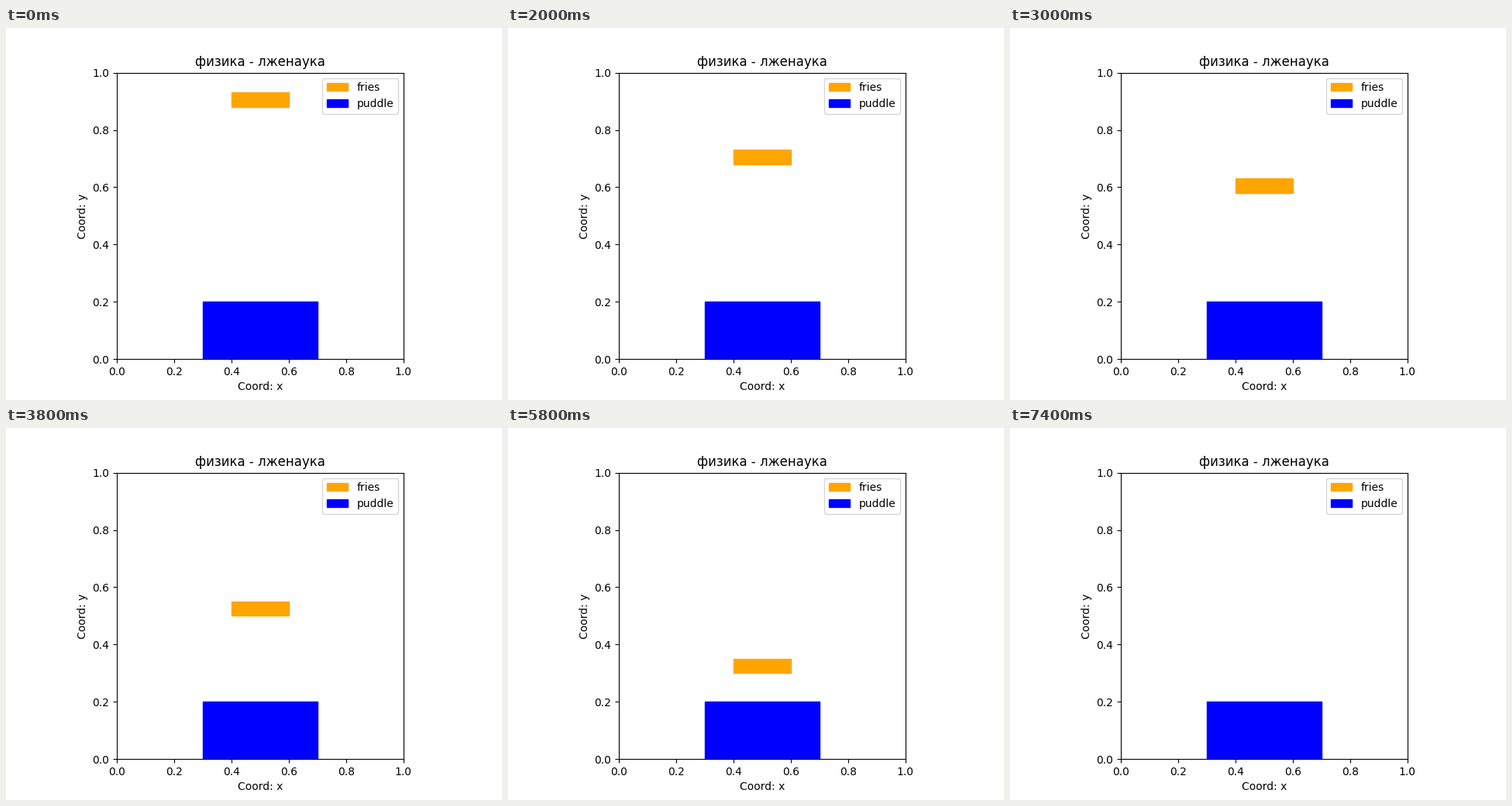
These frames come from a looping animation (640 px wide and 480 px high, 8 s). A matplotlib script:

```python
import matplotlib.pyplot as plt
from matplotlib.animation import FuncAnimation
from matplotlib.patches import Rectangle

FRAMES = 40
INTERVAL = 200  # ms
START_Y = 0.88
STEP = 0.02

fig, ax = plt.subplots(figsize=(6.4, 4.8), dpi=100)
ax.set_xlim(0, 1)
ax.set_ylim(0, 1)
ax.set_aspect("equal")
ax.set_title("физика - лженаука")
ax.set_xlabel("Coord: x")
ax.set_ylabel("Coord: y")

# The puddle is added last, so the fries sink behind it.
fries = ax.add_patch(Rectangle((0.4, START_Y), 0.2, 0.05, color="orange", label="fries"))
puddle = ax.add_patch(Rectangle((0.3, 0), 0.4, 0.2, color="blue", label="puddle"))
ax.legend(loc="upper right")


def update(frame):
    fries.set_y(START_Y - STEP * frame)
    return (fries,)


anim = FuncAnimation(fig, update, frames=FRAMES, interval=INTERVAL,
                     repeat=True, repeat_delay=0)
plt.show()
```
